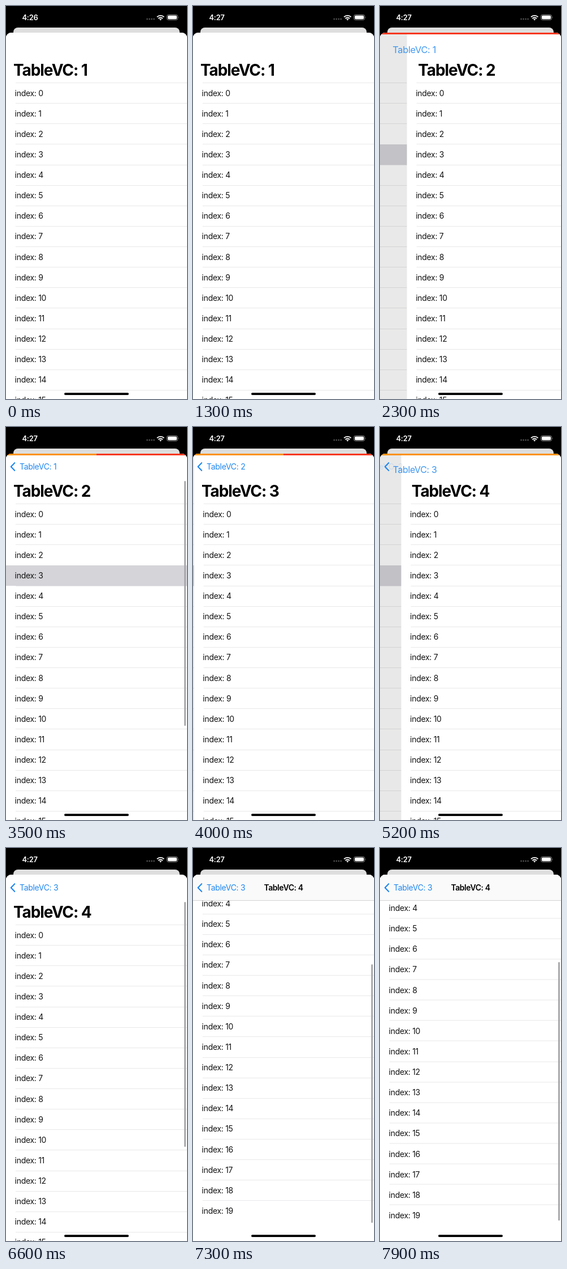
An HTML page for the animation above (8 s loop, 320 px wide and 693 px high).

```html
<!DOCTYPE html>
<html lang="en">
<head>
<meta charset="utf-8">
<title>Table navigation</title>
<style>
html, body { margin: 0; width: 100%; height: 100%; overflow: hidden; background: #000; }
body { font: 14px Inter, "Liberation Sans", sans-serif; font-optical-sizing: none; letter-spacing: -.022em; color: #111; }
div, svg { position: absolute; white-space: nowrap; }
#stage { left: 0; top: 0; width: 320px; height: 693px; overflow: hidden; background: #000; }
#clock { left: 28.5px; top: 12px; font-size: 13px; line-height: 17px; font-weight: 600; color: #fff; }
#behind { left: 13px; top: 38px; width: 294px; height: 30px; border-radius: 8px; background: #dedede; }
#sheet { left: 0; top: 46.5px; width: 320px; height: 647px; border-radius: 9px 9px 0 0; overflow: hidden; background: #fff; }
/* content keeps stage coordinates inside the sheet */
#view { left: 0; top: -46.5px; width: 320px; height: 693px; }
#pages, .page, .dim, #tint { left: 0; top: 0; width: 100%; height: 100%; }
.page { overflow: hidden; background: #fff; }
.rows { left: 0; top: 135.5px; width: 320px; }
.row { left: 0; width: 320px; height: 36.13px; line-height: 36.13px; text-indent: 15.6px; }
.row::before { content: ""; position: absolute; left: 17px; right: 0; top: -.5px; height: 1px; background: #e8e8ea; }
.row.on { background: #d5d4d9; }
.row.on::before { display: none; }
.thumb { left: 315px; top: 95px; width: 2.5px; border-radius: 2px; background: #a9a9ad; }
.dim { background: #000; opacity: 0; }
.large { left: 0; top: -17px; line-height: 34px; font-size: 28px; font-weight: 700; letter-spacing: -.039em; color: #000; transform-origin: 0 50%; }
.back { left: 0; top: -10px; line-height: 20px; color: #1f87f0; transform-origin: 0 50%; }
#cover { left: 0; top: 46px; width: 320px; height: 46px; background: #fff; }
#tint { background: #fafafa; border-bottom: 1px solid #d2d2d4; }
#small { left: 0; top: 60px; width: 320px; line-height: 20px; text-align: center; font-weight: 600; letter-spacing: -.03em; color: #000; }
.bar { left: 0; top: 46px; width: 320px; height: 4px; }
#red { background: #f7371d; }
#orange { background: #fb9210; }
#home { left: 103px; top: 682.3px; width: 114px; height: 4.2px; border-radius: 3px; background: #000; }
</style>
</head>
<body>
<div id="stage">
  <div id="clock"></div>
  <svg width="320" height="40" style="left:0;top:0">
    <g fill="#5a5a5a">
      <circle cx="249.6" cy="23" r="1.3"/><circle cx="253.6" cy="23" r="1.3"/>
      <circle cx="257.6" cy="23" r="1.3"/><circle cx="261.6" cy="23" r="1.3"/>
    </g>
    <g fill="none" stroke="#fff" stroke-width="1.9">
      <path d="M267 19.4a8.8 8.8 0 0 1 12.4 0M269.4 22a5.4 5.4 0 0 1 7.6 0"/>
    </g>
    <path d="M273.2 25.6l-2-2.1a2.9 2.9 0 0 1 4 0z" fill="#fff"/>
    <rect x="284.5" y="15.4" width="19" height="9.2" rx="2.8" fill="none" stroke="#8a8a8a"/>
    <rect x="286" y="16.8" width="16" height="6.4" rx="1.6" fill="#fff"/>
    <path d="M304.8 18.4q1.4 1.6 0 3.2z" fill="#8a8a8a"/>
  </svg>
  <div id="behind"></div>
  <div id="sheet"><div id="view">
    <div id="pages"></div>
    <div id="titles"></div>
    <div id="cover"><div id="tint"></div></div>
    <div id="backs"></div>
    <svg id="chevron" width="24" height="90" style="left:0;top:0">
      <path d="M15.3 63.2L8.8 70l6.5 6.8" fill="none" stroke="#1f87f0" stroke-width="2.1" stroke-linecap="round" stroke-linejoin="round"/>
    </svg>
    <div id="small">TableVC: 4</div>
    <div id="red" class="bar"></div>
    <div id="orange" class="bar"></div>
  </div></div>
  <div id="home"></div>
</div>
<script>
const LOOP = 8000, ROW = 36.13, END = 192.5;
const PUSH = [2102, 3570, 4984];        // start of each push
const TAP = [2090, 3490, 4890];         // row highlight
const FLASH = [Infinity, 2950, 4350, 5700]; // scroll thumb appears

const $ = id => document.getElementById(id);
const clamp = x => Math.min(1, Math.max(0, x));
const ease = (t, a, b) => { const x = clamp((t - a) / (b - a)); return x * x * (3 - 2 * x); };
const mix = (a, b, x) => a + (b - a) * x;

function add(parent, cls, text = '') {
  const el = document.createElement('div');
  el.className = cls;
  el.textContent = text;
  return parent.appendChild(el);
}

const pages = [1, 2, 3, 4].map(n => {
  const el = add($('pages'), 'page');
  const rows = add(el, 'rows');
  const cells = Array.from({ length: 20 }, (_, i) => {
    const cell = add(rows, 'row', 'index: ' + i);
    cell.style.top = i * ROW + 'px';
    return cell;
  });
  return {
    el, rows, cell: cells[3],
    thumb: add(el, 'thumb'),
    dim: add(el, 'dim'),
    large: add($('titles'), 'large', 'TableVC: ' + n),
    back: add($('backs'), 'back', n > 1 ? 'TableVC: ' + (n - 1) : '')
  };
});

// Remaining share of a critically damped push: 1 before, 0 when settled
function rest(t, start) {
  const s = (t - start) / 1000;
  if (s <= 0) return 1;
  if (s > .8) return 0;
  return (1 + 17 * s) * Math.exp(-17 * s);
}

// Drag to the end, slight overscroll, settle back
function scrollAt(t) {
  return (END + 10) * ease(t, 6620, 7350) - 10 * ease(t, 7350, 7900);
}

function place(el, x, y, scale, opacity) {
  el.style.transform = `translate(${x}px,${y}px) scale(${scale})`;
  el.style.opacity = opacity;
}

function draw(t) {
  const scroll = scrollAt(t);
  $('clock').textContent = t < 1300 ? '4:26' : '4:27';

  pages.forEach((p, i) => {
    const enter = i ? rest(t, PUSH[i - 1]) : 0;
    const leave = i < 3 ? 1 - rest(t, PUSH[i]) : 0;
    const navIn = i ? rest(t - 10, PUSH[i - 1]) : 0;
    const navOut = i < 3 ? rest(t - 10, PUSH[i]) : 1;
    const s = i === 3 ? scroll : 0;

    p.el.style.visibility = enter === 1 || leave === 1 ? 'hidden' : 'visible';
    p.el.style.transform = `translateX(${320 * enter - 96 * leave}px)`;
    p.dim.style.opacity = .1 * leave;
    p.rows.style.transform = `translateY(${-s}px)`;
    p.cell.classList.toggle('on', t >= TAP[i]);

    const k = s / END;
    p.thumb.style.transform = `translateY(${106 * k}px)`;
    p.thumb.style.height = 432 + 24 * Math.min(k, 1) + 'px';
    p.thumb.style.opacity = FLASH[i] < LOOP ? ease(t, FLASH[i], FLASH[i] + 250) : 0;

    // The large title shrinks into the next page's back label
    place(p.large, mix(24, 13, navOut) + 320 * navIn, mix(70, 113, navOut) - s,
      mix(.49, 1, navOut), clamp(navOut * 1.2 - .2));
    place(p.back, mix(24, 14, navIn) - 60 * (1 - navOut), mix(70, 113, navIn),
      1 + 1.04 * navIn, (1 - navIn) * navOut);
  });

  $('chevron').style.opacity = clamp(1 - 6 * rest(t - 10, PUSH[0]));
  $('cover').style.visibility = scroll > 0 ? 'visible' : 'hidden';
  $('tint').style.opacity = ease(scroll, 34, 50);
  $('small').style.opacity = ease(scroll, 28, 50);

  $('red').style.opacity = t >= 2090 && t < 4600 ? 1 : 0;
  $('orange').style.width = 160 * (ease(t, 2950, 3200) + ease(t, 4350, 4600)) + 'px';
  $('orange').style.opacity = 1 - ease(t, 5650, 5900);
}

function tick() {
  draw(performance.now() % LOOP);
  requestAnimationFrame(tick);
}
tick();
</script>
</body>
</html>
```
